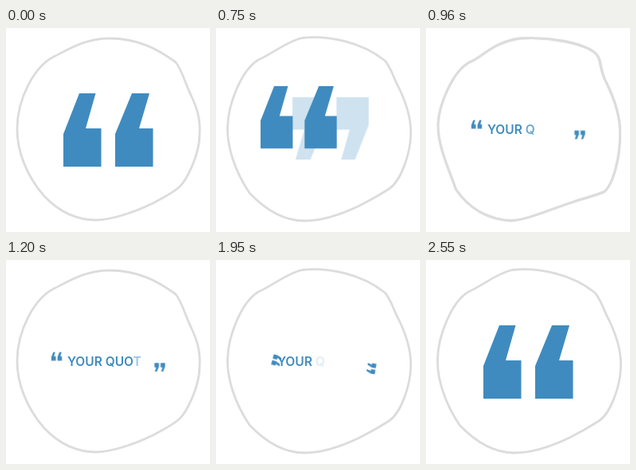
These frames come from a looping animation (256 px wide and 256 px high, 2.7 s). An HTML page without scripts:

```html
<!DOCTYPE html>
<html lang="en">
<head>
<meta charset="utf-8">
<title>Your quote</title>
<style>
html, body { margin: 0; width: 100%; height: 100%; overflow: hidden; background: #fff; }
body { position: relative; }
svg { position: absolute; left: 0; top: 0; width: 256px; height: 256px; }

/* hand-drawn ring: four poses, 150 ms each */
.ring {
  fill: none; stroke: #dcdcdc; stroke-width: 2.8; stroke-linejoin: round;
  animation: wobble 2.7s step-end infinite;
}
.echo { animation: echo 2.7s step-end infinite; }
@keyframes wobble {
  0%, 22.2222%, 44.4444%, 66.6666%, 88.8888% {
    d: path("M14 127C14 88 36 48 60 36C80 26 100 13 130 13C165 13 190 26 213 43C221 53 226 72 232 84C240 101 244 114 243 133C243 160 226 192 217 200C208 208 193 215 184 220C160 232 130 241 113 241C90 241 68 232 48 211C26 186 14 155 14 127Z");
  }
  5.5555%, 27.7777%, 50%, 72.2222%, 94.4444%, 100% {
    d: path("M14.5 125C15 95 32 53 53 40C70 33 88 17 108 12.5C140 9 182 17 212 41C220 50 224 66 230 76C239 95 245 115 244.5 133C244 158 232 192 217 202C203 211 190 218 180 223C155 235 130 242 111 242C85 242 62 228 42 207C24 180 14 150 14.5 125Z");
  }
  11.1111%, 33.3333%, 55.5555%, 77.7777% {
    d: path("M15 122C16 95 34 55 53 44C70 38 82 18 118 13C150 11 195 17 212 31C221 40 216 50 226 68C236 88 244 110 243.5 132C244 160 236 195 224 205C210 211 195 214 185 218C155 228 130 240 108 242C80 241 55 228 38 203C30 180 15 150 15 122Z");
  }
  16.6666%, 38.8888%, 61.1111%, 83.3333% {
    d: path("M14.5 126C15 92 36 52 56 40C76 32 92 14 124 13C158 12 192 22 213 38C221 50 222 62 229 76C238 94 244 112 243.5 132C243 160 231 194 220 203C206 211 194 216 182 221C156 232 130 241 112 242C86 241 62 230 43 207C26 182 14 152 14.5 126Z");
  }
}
/* second stroke that thickens the third pose */
@keyframes echo {
  0%, 16.6666%, 38.8888%, 61.1111%, 83.3333%, 100% { opacity: 0; }
  11.1111%, 33.3333%, 55.5555%, 77.7777% { opacity: 1; }
}

.mark { fill: #3f8bbf; }
.open { animation: open 2.7s infinite; }
.close { animation: close 2.7s infinite; }
@keyframes open {
  0% { transform: translate(128px, 128px) rotate(0deg) scale(1); animation-timing-function: step-end; }
  27.7777% { transform: translate(103.5px, 112px) rotate(0deg) scale(.85); animation-timing-function: steps(2); }
  30% { transform: translate(75px, 106px) rotate(0deg) scale(.5); animation-timing-function: steps(2); }
  32.2222% { transform: translate(63px, 115px) rotate(0deg) scale(.2); animation-timing-function: steps(2); }
  34.4444% { transform: translate(63.5px, 121px) rotate(0deg) scale(.118); }
  66.6666% { transform: translate(63.5px, 121px) rotate(0deg) scale(.118); animation-timing-function: steps(5); }
  72.2222% { transform: translate(76px, 126px) rotate(105deg) scale(.118); animation-timing-function: steps(2); }
  74.4444% { transform: translate(100px, 130px) rotate(200deg) scale(.2); animation-timing-function: steps(2); }
  76.6666% { transform: translate(120px, 129px) rotate(310deg) scale(.6); animation-timing-function: steps(2); }
  78.8888%, 100% { transform: translate(128px, 128px) rotate(360deg) scale(1); }
}
@keyframes close {
  0% { opacity: 0; transform: translate(128px, 128px) rotate(180deg) scale(1); animation-timing-function: step-end; }
  27.7777% { opacity: .25; transform: translate(144px, 126px) rotate(180deg) scale(.85); animation-timing-function: steps(2); }
  30% { opacity: .55; transform: translate(172px, 124px) rotate(180deg) scale(.5); animation-timing-function: steps(2); }
  32.2222% { opacity: .85; transform: translate(190px, 130px) rotate(180deg) scale(.2); animation-timing-function: steps(2); }
  34.4444% { opacity: 1; transform: translate(193px, 134px) rotate(180deg) scale(.118); }
  50% { opacity: 1; transform: translate(193px, 134.6px) rotate(180deg) scale(.118); }
  66.6666% { opacity: 1; transform: translate(193px, 134.6px) rotate(180deg) scale(.118); animation-timing-function: steps(5); }
  72.2222% { opacity: 1; transform: translate(195px, 136px) rotate(280deg) scale(.118); animation-timing-function: steps(2); }
  74.4444% { opacity: .9; transform: translate(175px, 135px) rotate(300deg) scale(.2); animation-timing-function: steps(2); }
  76.6666% { opacity: .5; transform: translate(145px, 130px) rotate(340deg) scale(.6); animation-timing-function: steps(2); }
  78.8888%, 100% { opacity: 0; transform: translate(128px, 128px) rotate(360deg) scale(1); }
}

/* letters: outer span fades in at --in, inner span fades out at --out */
p {
  position: absolute; left: 0; top: 118px; width: 256px; margin: 0;
  font: 600 15.5px/20px Inter, sans-serif; color: #3f8bbf;
  text-align: center; white-space: pre;
}
p span { animation: show 2.7s linear var(--in) infinite backwards; }
p b { font-weight: inherit; animation: hide 2.7s linear var(--out) infinite backwards; }
@keyframes show {
  0% { opacity: 0; }
  2.2222%, 53.7% { opacity: 1; }
  53.71%, 100% { opacity: 0; }
}
@keyframes hide {
  0% { opacity: 1; }
  2.2222%, 40% { opacity: 0; }
  40.01%, 100% { opacity: 1; }
}
</style>
</head>
<body>
<p><span style="--in:780ms;--out:2025ms"><b>Y</b></span><span style="--in:815ms;--out:2000ms"><b>O</b></span><span style="--in:850ms;--out:1975ms"><b>U</b></span><span style="--in:880ms;--out:1950ms"><b>R</b></span> <span style="--in:915ms;--out:1900ms"><b>Q</b></span><span style="--in:1000ms;--out:1875ms"><b>U</b></span><span style="--in:1085ms;--out:1850ms"><b>O</b></span><span style="--in:1170ms;--out:1825ms"><b>T</b></span><span style="--in:1250ms;--out:1800ms"><b>E</b></span></p>
<svg viewBox="0 0 256 256">
  <defs>
    <path id="quote" d="M-56 5L-36 -46H-15.5L-28 -2H-8.5V46H-56ZM9 5L30 -46H52L39 -2H56.5V46H9Z"/>
  </defs>
  <path class="ring"/>
  <g class="echo" opacity="0"><g transform="rotate(.8 128 128)"><path class="ring"/></g></g>
  <g class="mark close"><use href="#quote"/></g>
  <g class="mark open"><use href="#quote"/></g>
</svg>
</body>
</html>
```
